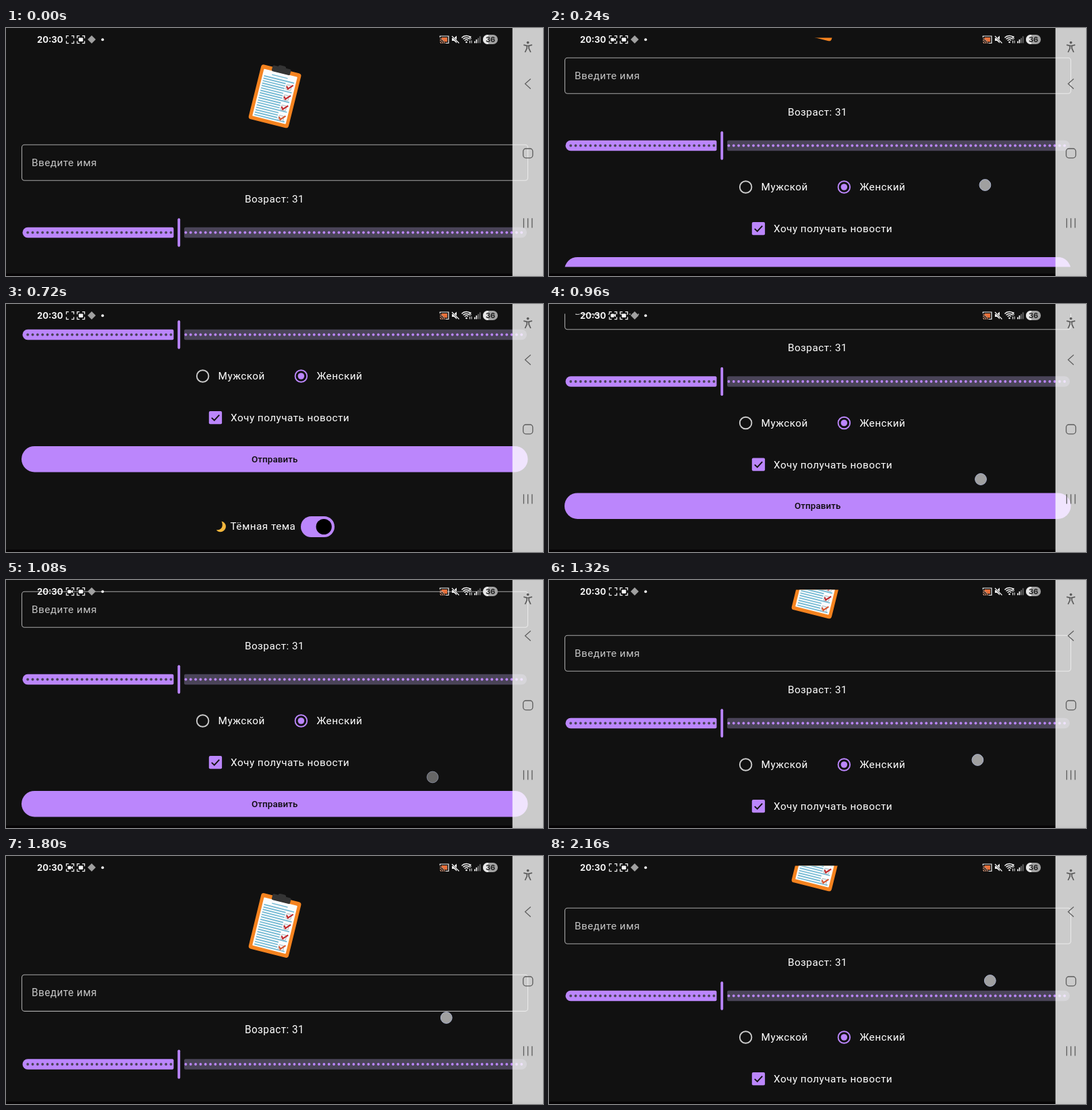
An HTML page with a canvas for the animation above (2.28 s loop, 796 px wide and 368 px high).

```html
<!DOCTYPE html>
<html lang="ru">
<head>
<meta charset="utf-8">
<title>Форма</title>
<style>
  html, body { margin: 0; width: 796px; height: 368px; overflow: hidden; background: #111; }
  canvas { display: block; width: 796px; height: 368px; }
</style>
</head>
<body>
<canvas id="stage"></canvas>
<script>
const W = 796, H = 368, LOOP = 2280, STEP = 120;
const TOP = 14.5, BOTTOM = 354.5, END = 258;
const BG = '#111111', PURPLE = '#bb86fc', MUTED = '#4a4458', TEXT = '#ffffff';
const canvas = document.getElementById('stage');
const dpr = window.devicePixelRatio || 1;
canvas.width = W * dpr;
canvas.height = H * dpr;
const ctx = canvas.getContext('2d');

// turning points of the page: time and scroll
const turns = [[0, 0], [480, END], [720, END], [960, 188.5], [1320, 91], [1680, 0], [1920, 0], [2160, 96]];

// while held, a finger moves with the page: y = grip - scroll
const touches = [
  { from: 120, to: 480, grip: 362, shift: 0 },
  { from: 840, to: 1080, grip: 448.5, shift: 0 },
  { from: 1200, to: 1440, grip: 358, shift: -3 },
  { from: 1720, to: 1900, grip: 240, shift: 8 },
  { from: 1920, to: LOOP, grip: 281, shift: -4 }
];

function scrollAt(t) {
  const i = turns.findLastIndex(([start]) => start <= t);
  const [t0, a] = turns[i], [t1, b] = turns[i + 1] || [LOOP, a];
  return a + (b - a) * (t - t0) / (t1 - t0);
}

// smooth pulse around a moment, zero beyond its reach
function pulse(t, mid, reach) {
  const k = Math.min(1, Math.abs(t - mid) / reach);
  return (1 + Math.cos(Math.PI * k)) / 2;
}

function box(x, y, w, h, r, fill, stroke, line = 1) {
  ctx.beginPath();
  ctx.roundRect(x, y, w, h, r);
  paint(fill, stroke, line);
}

function circle(x, y, r, fill, stroke, line = 1) {
  arc(x, y, r, 0, Math.PI * 2, fill, stroke, line);
}

function arc(x, y, r, a, b, fill, stroke, line) {
  ctx.beginPath();
  ctx.arc(x, y, r, a, b);
  paint(fill, stroke, line);
}

function paint(fill, stroke, line) {
  if (fill) { ctx.fillStyle = fill; ctx.fill(); }
  if (stroke) { ctx.strokeStyle = stroke; ctx.lineWidth = line; ctx.stroke(); }
}

function trace(points) {
  ctx.beginPath();
  points.forEach(([x, y]) => ctx.lineTo(x, y));
}

function line(points, color, width) {
  trace(points);
  paint(null, color, width);
}

function shape(points, color) {
  trace(points);
  paint(color);
}

function write(str, x, y, { color = TEXT, font = '15.3px Roboto, sans-serif', space = 0.47, align = 'left' } = {}) {
  ctx.font = font;
  ctx.letterSpacing = space + 'px';
  ctx.textAlign = align;
  ctx.fillStyle = color;
  ctx.fillText(str, x, y);
}

const bold = (size, color = '#f4f4f4', align = 'left') =>
  ({ color, font: `700 ${size}px Inter, sans-serif`, space: 0, align });

function clipboard() {
  ctx.save();
  ctx.translate(398.5, 101.6);
  ctx.rotate(14 * Math.PI / 180);
  box(-30.5, -42, 61, 83.4, 4, '#f5831f');
  box(-25.5, -36, 51, 72, 1, '#fafcfd');
  box(-14, -44.5, 28, 9, 2, '#343434');
  box(-6, -47, 12, 6, 3, '#343434');
  line([[-12, -30.5], [12, -30.5]], '#6fb7d2', 1.4);
  for (let i = 0; i < 17; i++) {
    const y = -26 + i * 3.7;
    line([[-23, y], [i % 4 ? 11 : 23, y]], '#6fb7d2', 1.7);
  }
  for (let i = 0; i < 4; i++) {
    const y = -18 + i * 15.6;
    box(13, y - 3.5, 7.5, 7.5, 1, '#f6f6f6', '#a9b4ba', 0.9);
    line([[13.5, y - 1], [16, y + 2.5], [22.5, y - 4.5]], i === 3 ? '#d9542c' : '#c3262a', 2.1);
  }
  ctx.restore();
}

function slider() {
  const y = 303.5, x0 = 24.5, handle = 256.3, x1 = 772, gap = 7.8;
  box(x0, y - 7.7, handle - gap - x0, 15.4, [7.7, 2, 2, 7.7], PURPLE);
  box(handle + gap, y - 7.7, x1 - handle - gap, 15.4, [2, 7.7, 7.7, 2], MUTED);
  for (let i = 0; i <= 100; i++) {
    const x = 32.2 + i * 7.32;
    if (Math.abs(x - handle) < gap + 1.5) continue;
    circle(x, y, 1.9, x < handle ? MUTED : PURPLE);
  }
  box(handle - 1.9, y - 21.2, 3.8, 42.4, 1.9, PURPLE);
}

function radio(x, on, str) {
  const y = 365;
  circle(x, y, 8.8, null, on ? PURPLE : '#cbcbcb', 1.9);
  if (on) circle(x, y, 4.8, PURPLE);
  write(str, x + 23, y + 5);
}

function moon() {
  ctx.beginPath();
  ctx.moveTo(319.5, 580.5);
  ctx.bezierCurveTo(326.5, 582, 328, 590, 323, 594.3);
  ctx.bezierCurveTo(319.5, 597.3, 314, 596.6, 311.8, 593.2);
  ctx.bezierCurveTo(319, 594.2, 323, 588, 319.5, 580.5);
  paint('#f3b63c');
}

function content(scroll, stretch) {
  ctx.save();
  ctx.beginPath();
  ctx.rect(0, TOP, W, BOTTOM - TOP);
  ctx.clip();
  const pivot = scroll > 0 ? BOTTOM : TOP;
  ctx.translate(0, pivot);
  ctx.scale(1, 1 + stretch);
  ctx.translate(0, -pivot - scroll);

  clipboard();
  box(23.5, 173.2, 750, 53.1, 4, null, '#a6a6a6', 1.1);
  write('Введите имя', 38, 204.7, { color: '#c4c4c4' });
  write('Возраст: 31', 398, 258.8, { align: 'center' });
  slider();
  radio(291.6, false, 'Мужской');
  radio(437.4, true, 'Женский');
  box(300.8, 417, 19.3, 19.3, 2, PURPLE);
  line([[304.8, 426.9], [308.8, 430.7], [316.2, 422.7]], BG, 1.9);
  write('Хочу получать новости', 333, 432);
  box(23, 468.9, 750.5, 38.6, 19.3, PURPLE);
  write('Отправить', 398.2, 492.8,
    { color: '#0a0a0a', font: '500 13.4px Roboto, sans-serif', space: 0.1, align: 'center' });
  moon();
  write('Тёмная тема', 332.5, 593.3);
  box(437, 573.1, 50, 30.8, 15.4, PURPLE);
  circle(471.2, 588.5, 11.6, '#000');
  ctx.restore();
}

function corners(x, y) {
  const size = 5.5, arm = 3.5;
  for (const sx of [-1, 1]) for (const sy of [-1, 1]) {
    const px = x + sx * size, py = y + sy * size;
    line([[px - sx * arm, py], [px, py], [px, py - sy * arm]], '#ececec', 1.3);
  }
}

function statusBar(recording) {
  const white = '#f4f4f4';
  write('20:30', 46, 21.8, bold(13));
  corners(95, 17.2);
  if (recording) {
    box(91.5, 14.7, 5, 5, 1, white);
    shape([[96, 17.2], [99, 14.8], [99, 19.6]], white);
  }
  corners(111, 17.2);
  box(107.8, 14.4, 6.4, 5.6, 1, white);
  shape([[127, 11], [133, 17], [127, 23], [121, 17]], '#a0a0a0');
  circle(143.2, 17.2, 2, white);

  // casting
  line([[643.3, 14], [643.3, 12], [656, 12], [656, 22.5], [651.5, 22.5]], white, 1.2);
  shape([[645.5, 14], [654, 14], [654, 20.5], [651, 20.5], [645.5, 15.5]], '#e8703a');
  for (let r = 2; r < 8; r += 2.5) arc(643, 23, r, -Math.PI / 2, 0, null, '#f0a582', 1.2);

  // muted speaker
  shape([[661, 15], [664, 15], [668, 11.5], [668, 22.5], [664, 19], [661, 19]], white);
  line([[660.5, 11.5], [671.5, 22.5]], BG, 2.4);
  line([[661, 12], [671.5, 22.5]], white, 1.2);

  // wireless and signal
  for (let r = 4; r <= 10; r += 3) arc(682.5, 21.5, r, -Math.PI * 0.75, -Math.PI * 0.27, null, white, 1.4);
  circle(682.5, 21, 1.3, white);
  write('5', 686, 16.5, bold(6.5));
  for (const x of [687.5, 690]) line([[x, 18.5], [x, 22.5]], white, 1);
  for (let i = 0; i < 4; i++) {
    const h = 3 + i * 2.4;
    box(694 + i * 2.6, 22.5 - h, 1.7, h, 0.4, i < 2 ? white : '#6a6a6a');
  }

  // battery
  box(707, 10, 22, 14, 7, '#a2a2a2');
  box(707, 10, 8, 14, [7, 0, 0, 7], '#e6e6e6');
  write('36', 718, 21, bold(11, '#202020', 'center'));
}

function navBar() {
  const gray = '#5c5c5c', mid = 773.6, edge = 750.7;
  box(edge, 0, W - edge, H, 0, 'rgba(255,255,255,.78)');
  circle(mid, 21.6, 1.9, gray);
  for (const s of [-1, 1]) {
    line([[mid, 26.3], [mid + s * 2, 26.2], [mid + s * 6.3, 25.2]], gray, 1.7);
    line([[mid + s * 1.4, 26], [mid + s * 1.4, 30], [mid + s * 4.2, 36]], gray, 1.7);
  }
  line([[777.7, 75.5], [769.5, 82.8], [777.7, 90.2]], gray, 1.2);
  box(766.6, 179, 14.2, 13.8, 4, null, gray, 1.3);
  for (let i = -1; i <= 1; i++) line([[mid + i * 6.2, 282.3], [mid + i * 6.2, 296.5]], gray, 1.3);
}

function finger(t, scroll) {
  const touch = touches.find(p => t >= p.from && t <= p.to);
  if (!touch) return;
  const y = touch.grip - scroll;
  const x = 677 - (y - 104) * 0.237 + touch.shift;
  ctx.globalAlpha = Math.min(1, 0.6 + (touch.to - t) / 150);
  circle(x, y, 8.4, '#a0a0a0', '#a9b1cc', 1);
  ctx.globalAlpha = 1;
}

function draw(t) {
  const scroll = scrollAt(t);
  const stretch = 0.0113 * pulse(t, 480, 240) + 0.019 * pulse(t, 1800, 180);
  ctx.setTransform(dpr, 0, 0, dpr, 0, 0);
  box(0, 0, W, H, 0, BG);
  box(0, 364.5, W, 3.5, 0, '#050304');
  content(scroll, scroll >= END || scroll <= 0 ? stretch : 0);
  const beat = (t / STEP) % 7;
  statusBar(beat >= 1 && beat <= 3);
  finger(t, scroll);
  navBar();
}

const start = performance.now();
function tick() {
  const t = (performance.now() - start) % LOOP;
  draw(Math.floor(t / STEP) * STEP);
  requestAnimationFrame(tick);
}
tick();
</script>
</body>
</html>
```
